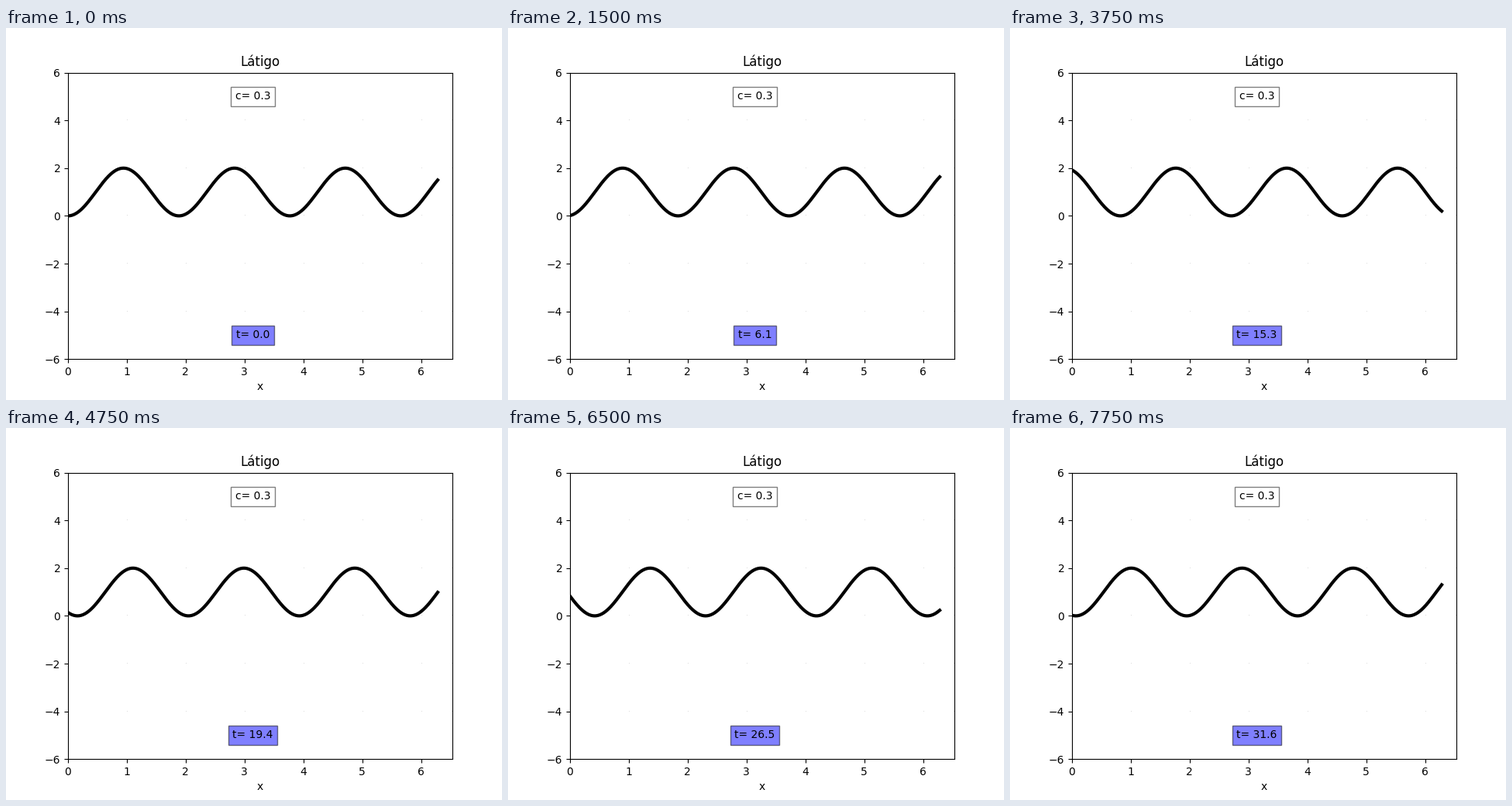
Animation of 640 by 480 pixels, one loop 8000 ms. Source, as a matplotlib script:

```python
import numpy as np
import matplotlib.pyplot as plt
from matplotlib.animation import FuncAnimation

FRAMES, INTERVAL = 32, 250
C = 0.3
STEP = 50 / 49
X_MAX = 2 * np.pi + 0.25

fig, ax = plt.subplots(figsize=(6.4, 4.8), dpi=100)
ax.set(xlim=(0, X_MAX), ylim=(-6, 6), title="Látigo", xlabel="x")

# Faint dots where the grid lines would cross
gx, gy = np.meshgrid(np.append(np.arange(1, 7), X_MAX - 0.013),
                     np.arange(-4, 5, 2))
ax.plot(gx.ravel(), gy.ravel(), ",", color="#dcdcdc", zorder=1)

x = np.linspace(0, 2 * np.pi, 400)
wave, = ax.plot([], [], color="black", lw=3)


def label(y, color):
    return ax.text(np.pi, y, "", ha="center", va="center",
                   bbox={"facecolor": color, "alpha": 0.5})


label(5, "white").set_text(f"c= {C:.1f}")
clock = label(-5, "blue")


def update(i):
    t = i * STEP
    wave.set_data(x, 1 - np.cos(x / C - t))
    clock.set_text(f"t= {t:.1f}")
    return wave, clock


anim = FuncAnimation(fig, update, frames=FRAMES, interval=INTERVAL,
                     repeat=True)
plt.show()
```
